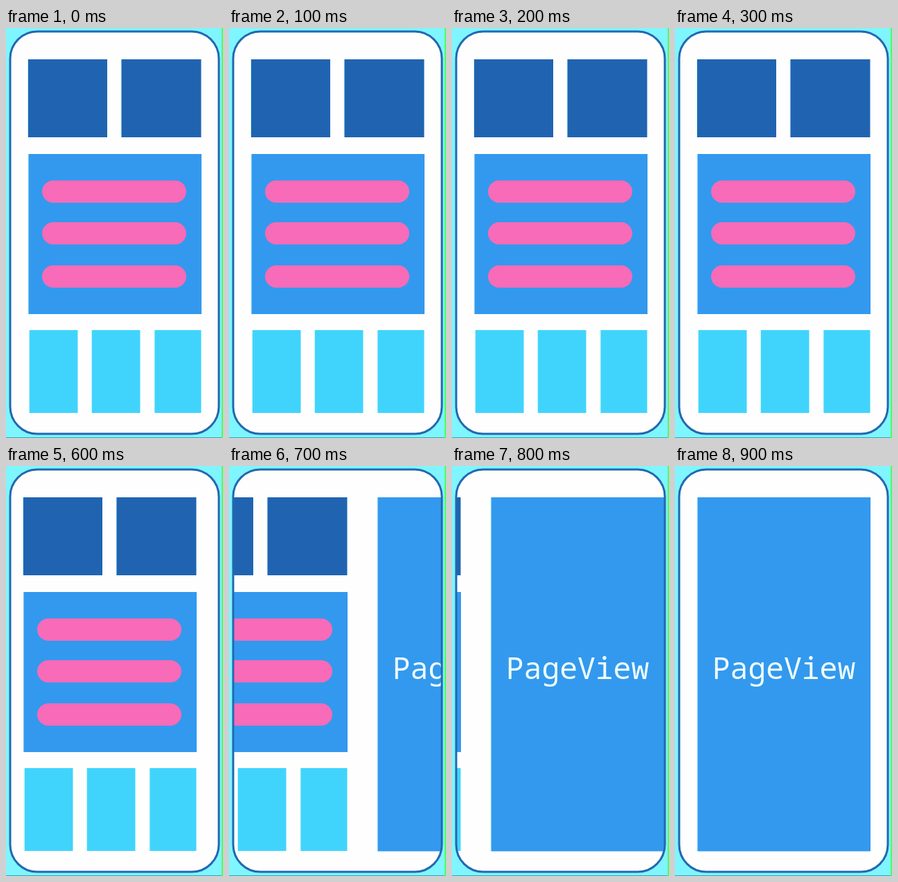
These frames come from a looping animation (313x589 px, 1 s). An HTML page:

```html
<!DOCTYPE html>
<html lang="en">
<head>
<meta charset="utf-8">
<title>PageView</title>
<style>
  html, body { margin: 0; width: 100%; height: 100%; overflow: hidden; background: #7ff5ff; }
  svg { display: block; width: 313px; height: 589px; }
  .dark { fill: #2064b1; }
  .blue { fill: #3399ee; }
  .pink { fill: #f76bb8; }
  .cyan { fill: #40d4fc; }
  .glow { fill: #c4f7f8; }
  text { font: 400 43px "Roboto Mono", "Noto Sans Mono", "DejaVu Sans Mono", monospace; fill: #eefffd; text-anchor: middle; }
</style>
</head>
<body>
<svg viewBox="0 0 313 589">
  <defs>
    <clipPath id="screen"><rect x="6" y="5" width="300" height="578" rx="39"/></clipPath>
  </defs>
  <rect x="311" width="2" height="589" fill="#4dff5c"/>
  <rect y="588" width="311" height="1" fill="#3f9fb5"/>
  <rect x="6" y="5" width="301" height="578" rx="39" fill="#fefefe"/>
  <g clip-path="url(#screen)">
    <g id="pages"></g>
  </g>
  <rect x="6" y="5" width="301" height="578" rx="39" fill="none" stroke="#2268b0" stroke-width="3"/>
</svg>
<script>
  const pages = document.getElementById("pages");
  const PAGE = 293;

  function add(tag, attrs) {
    const el = document.createElementNS("http://www.w3.org/2000/svg", tag);
    for (const key in attrs) el.setAttribute(key, attrs[key]);
    return pages.appendChild(el);
  }

  function block(cls, x, y, right, bottom) {
    const height = bottom - y;
    add("rect", { class: "glow", x: x - 1, y, width: 1, height });
    add("rect", { class: cls, x, y, width: right - x, height });
  }

  // First page: cards and list
  block("dark", 32, 45, 146, 157);
  block("dark", 166.5, 45, 281.5, 157);
  block("blue", 32.5, 181, 282, 411);
  for (const y of [219, 279, 341]) {
    add("rect", { class: "pink", x: 52, y, width: 208, height: 32, rx: 16 });
  }
  block("cyan", 34, 434, 103.5, 553);
  block("cyan", 124, 434, 193.5, 553);
  block("cyan", 214.5, 434, 281.5, 553);

  // Second page
  block("blue", 32.5 + PAGE, 45, 282 + PAGE, 553.5);
  add("text", { x: 157 + PAGE, y: 306 }).textContent = "PageView";

  const steps = [[0, 0], [0.6, -7], [0.7, -111], [0.8, -269], [0.9, -PAGE], [1, -PAGE]];
  pages.animate(
    steps.map(([offset, x]) => ({ offset, transform: `translateX(${x}px)`, easing: "step-end" })),
    { duration: 1000, iterations: Infinity }
  );
</script>
</body>
</html>
```
